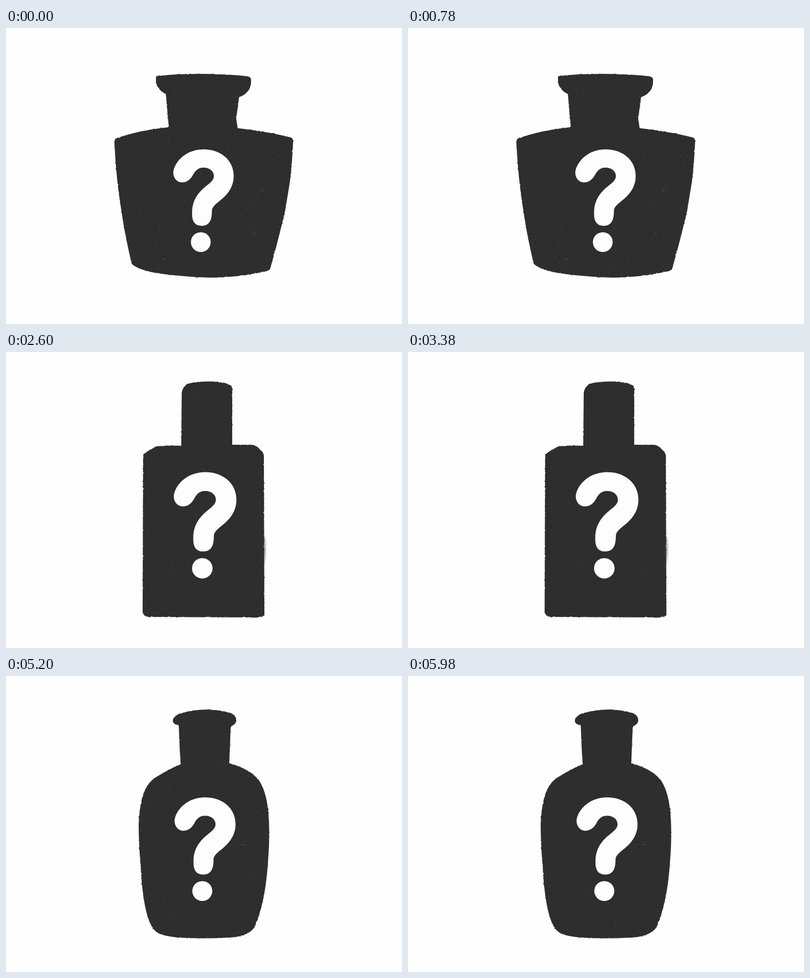
An HTML page that plays this animation: 800x600 px, repeating every 6.5 s.

```html
<!DOCTYPE html>
<html lang="en">
<head>
<meta charset="utf-8">
<title>Mystery bottles</title>
<style>
  html, body { margin: 0; width: 100%; height: 100%; overflow: hidden; background: #fefefe; }
  svg { display: block; width: 100vw; height: 100vh; }
  .bottle { visibility: hidden; animation: show 6500ms step-end infinite; animation-delay: calc(var(--i) * 1300ms - 6500ms); }
  .body { fill: #2b2b2b; }
  .mark { fill: #fdfdfd; }
  .specks { fill: none; stroke: #707070; stroke-width: .8; stroke-linecap: round; }
  @keyframes show {
    0% { visibility: visible; }
    20%, 100% { visibility: hidden; }
  }
</style>
</head>
<body>
<svg viewBox="0 0 800 600">
  <defs>
    <filter id="chalk" filterUnits="userSpaceOnUse" x="0" y="0" width="800" height="600" color-interpolation-filters="sRGB">
      <feTurbulence type="fractalNoise" baseFrequency=".25" numOctaves="2" seed="4" result="wobble"/>
      <feDisplacementMap in="SourceGraphic" in2="wobble" scale="2.5" xChannelSelector="R" yChannelSelector="G" result="rough"/>
      <feTurbulence type="fractalNoise" baseFrequency=".7" numOctaves="2" seed="9"/>
      <feColorMatrix values="0 0 0 0 1  0 0 0 0 1  0 0 0 0 1  .16 0 0 0 -.068"/>
      <feComposite in2="rough" operator="in" result="grain"/>
      <feMerge><feMergeNode in="rough"/><feMergeNode in="grain"/></feMerge>
    </filter>
    <filter id="soft" x="-200%" y="-20%" width="500%" height="140%"><feGaussianBlur stdDeviation="1.5 8"/></filter>
    <g id="mark" class="mark">
      <path d="M0 45C4 22 28 0 61 0C96 0 122 22 122 54C122 72 114 87 99 100C86 111 78 116 78 125C78 145 72 155 57 155C43 155 37 145 38 128C38 110 44 94 62 78C74 68 82 63 82 54C82 44 73 37 61 37C49 37 44 44 39 53C33 63 26 67 17 67C7 67 -1 57 0 45Z"/>
      <circle cx="55.5" cy="188" r="20"/>
    </g>
  </defs>
  <ellipse class="bottle" style="--i:2" cx="522" cy="400" rx="3" ry="26" fill="#aaa" filter="url(#soft)"/>
</svg>
<script>
const svg = document.querySelector('svg');

// outline, question mark placement, number of light specks
const bottles = [
  { d: 'M303 100Q302 97 310 97Q340 93 400 93Q460 94 488 98Q496 100 495 106C496 122 488 134 471 140L465 184L468 203Q530 210 576 222Q581 225 580 232Q577 290 573 315L564 370Q550 430 534 487Q532 492 526 493Q470 506 415 506Q350 504 300 496Q265 489 254 478Q240 420 233 370Q223 310 219 234Q218 226 224 223Q270 207 329 201L325 160L323 134Q304 124 303 108Z',
    x: 338, y: 246, scale: 1, specks: 150 },
  { d: 'M346 158C334 146 328 130 328 110C328 80 355 53 400 54C440 56 465 82 465 115C464 138 456 153 441 161Q451 164 449 172Q448 180 440 181L441 215Q450 217 450 225Q449 231 447 233C490 245 513 285 516 325C522 370 514 395 505 425C497 460 482 495 467 522Q458 538 443 541Q400 549 365 543Q348 542 342 535C325 505 308 465 301 435C290 405 281 380 282 345C283 300 295 252 350 232Q344 229 346 222Q347 217 353 216L352 180Q344 177 344 170Q345 162 356 162Z',
    x: 333, y: 244, scale: 1.057, specks: 20 },
  { d: 'M355 85Q355 71 368 64Q390 59 420 60Q446 61 455 69Q458 74 457 85L457 188L495 188Q506 188 513 198Q521 203 521 212L522 534Q510 540 495 538L286 537Q275 534 276 525L277 208Q288 199 305 191Q330 189 354 190Z',
    x: 339, y: 243.5, scale: 1.037, specks: 0 },
  { d: 'M337 110Q338 92 349 86Q370 75 405 75Q440 76 461 91Q469 97 469 112L471 178Q484 184 485 198Q485 207 482 209C522 228 552 268 572 297Q582 320 582 350C584 450 522 524 400 524C282 524 218 452 218 350C219 298 255 240 325 207Q319 200 321 190Q324 180 337 178Z',
    x: 340, y: 246, scale: 1.016, specks: 50 },
  { d: 'M337 90Q338 80 355 75Q380 68 405 68Q440 69 458 77Q466 82 465 92Q463 99 454 102L451 177Q490 187 510 210Q528 235 531 290Q533 330 530 365C527 420 520 465 505 502Q500 522 465 529Q420 533 365 531Q315 529 303 518C282 500 275 440 272 385Q268 340 268 300C270 260 276 220 305 204Q330 188 353 179L351 150L349 100Q337 98 337 90Z',
    x: 340.5, y: 246, scale: 1.01, specks: 60 }
];

function seeded(seed) {
  return () => (seed = seed * 16807 % 2147483647) / 2147483647;
}

function add(parent, tag, attrs) {
  const el = document.createElementNS('http://www.w3.org/2000/svg', tag);
  for (const key in attrs) el.setAttribute(key, attrs[key]);
  return parent.appendChild(el);
}

function speckPath(count, rand) {
  let d = '';
  for (let k = 0; k < count; k++) {
    const x = 215 + rand() * 370, y = 90 + rand() * 430;
    const length = rand() < .12 ? 4 : .6;
    d += `M${x.toFixed(1)} ${y.toFixed(1)}l${length} ${(rand() - .5).toFixed(1)}`;
  }
  return d;
}

bottles.forEach(({ d, x, y, scale, specks }, i) => {
  const clip = add(svg, 'clipPath', { id: 'clip' + i });
  add(clip, 'path', { d });
  const bottle = add(svg, 'g', { class: 'bottle', style: `--i:${i}` });
  const glass = add(bottle, 'g', { filter: 'url(#chalk)' });
  add(glass, 'path', { class: 'body', d });
  if (specks) {
    add(glass, 'path', { class: 'specks', d: speckPath(specks, seeded(71 + i * 13)), 'clip-path': `url(#clip${i})` });
  }
  add(bottle, 'use', { href: '#mark', transform: `translate(${x} ${y}) scale(${scale})` });
});
</script>
</body>
</html>
```
